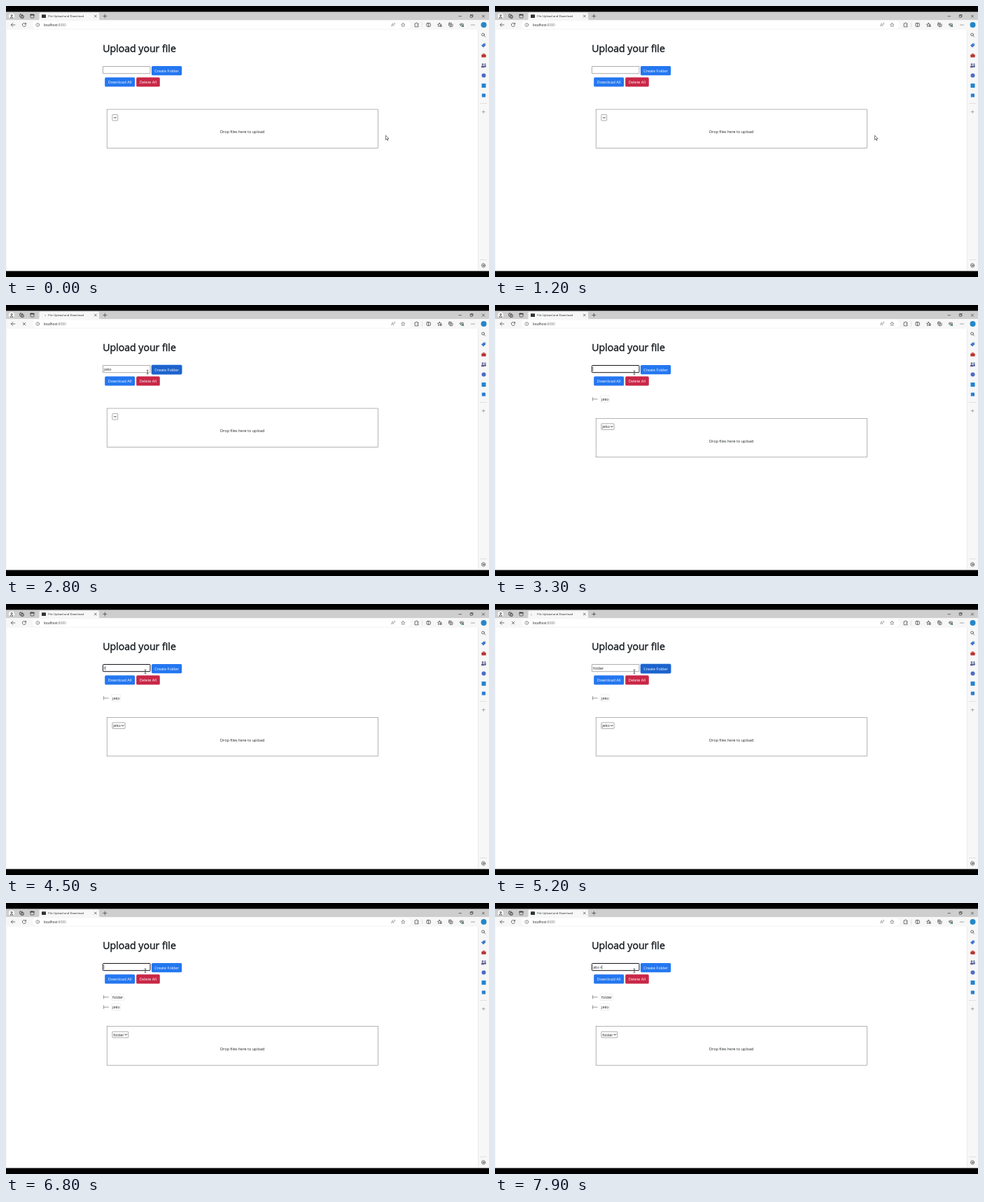
Write an HTML page that moves like this. It is 690x388 px and loops after 8000 ms.

```html
<!DOCTYPE html>
<html lang="en">
<head>
<meta charset="utf-8">
<title>File Upload and Download</title>
<style>
html, body { margin: 0; width: 100%; height: 100%; overflow: hidden; background: #000; }
svg { display: block; width: 690px; height: 388px; }
text { font: 5.5px 'Open Sans', 'Noto Sans', sans-serif; fill: #1c2024; white-space: pre; }
.ink { fill: none; stroke: #3c3c3c; stroke-width: .7; stroke-linecap: round; stroke-linejoin: round; }
.btn { fill: #fff; }
.head { font-size: 14.1px; stroke: #1c2024; stroke-width: .45; }
</style>
</head>
<body>
<svg viewBox="0 0 690 388">
  <rect width="690" height="388" fill="#000"/>
  <rect y="8.600" width="690" height="370.900" fill="#f7f7f7"/>
  <rect y="8.600" width="690" height="11.400" fill="#cecece"/>
  <path d="M46 20q1.500 0 1.500-1.500V11q0-1.500 1.500-1.500H131.500q1.500 0 1.500 1.500v7.500q0 1.500 1.500 1.500z" fill="#f7f7f7"/>
  <rect x="38" y="21.500" width="540" height="11" rx="5.500" fill="#fff"/>
  <rect x="1" y="34" width="673" height="344.500" rx="1.500" fill="#fff"/>
  <path d="M674.500 34V378.500" stroke="#e9e9e9" stroke-width=".8"/>
  <path d="M594.500 23.500v7M677 139.500h10M677 363.500h10" stroke="#d8d8d8" stroke-width=".7"/>

  <!-- tab strip -->
  <circle cx="8" cy="14.500" r="4" fill="#fff"/>
  <g class="ink">
    <circle cx="8" cy="13.400" r="1.100"/>
    <path d="M6 17q0-1.500 2-1.500t2 1.500z"/>
    <rect x="19.500" y="12" width="4" height="4" rx="1"/>
    <rect x="21.300" y="13.500" width="4" height="4" rx="1" fill="#999"/>
    <rect x="35" y="12" width="5" height="5" rx=".8"/>
    <path d="M35 12.700h5" stroke-width="1.400"/>
    <path d="M126.300 13l3 3m0-3l-3 3M138.800 14.500h5m-2.500-2.500v5"/>
    <path d="M647 14.700h3.500M680.300 13l3.200 3.200m0-3.200l-3.200 3.200M664 13v-.5h3v3h-.6"/>
    <rect x="663.200" y="13.300" width="3" height="3" rx=".5"/>
  </g>
  <rect id="icon" x="51" y="12.300" width="6" height="4.600" rx=".5" fill="#2f3437"/>
  <path id="spin" class="ink" style="stroke:#777"/>
  <text id="title" x="60.300" y="16" style="font-size:4.150px"></text>

  <!-- toolbar -->
  <g class="ink">
    <path d="M12.800 27H7.300m2.400-2.400L7.300 27l2.400 2.400"/>
    <path id="reload" d="M28.300 25.700a2.600 2.600 0 1 0 .2 2M28.500 24.300v1.700h-1.700"/>
    <path id="stop" d="M24.200 25.200l3.600 3.600m0-3.600l-3.600 3.600"/>
    <g style="stroke:#777">
      <circle cx="45.300" cy="27" r="2.500"/>
      <path d="M45.300 26.800v1.300M45.300 25.600v.1"/>
      <path d="M550.500 29l1.700-4.300 1.700 4.300m-2.800-1.400h2.200M554.300 24.500q1 .8 0 1.800M555.300 23.900q1.500 1.400 0 2.900" stroke-width=".5"/>
    </g>
    <path class="star" style="stroke:#777"/>
    <path d="M584.500 25h1.200q0-1 .9-1t.9 1h1.500v1.500q-1.200 0-1.200.8t1.200.8v1.700h-4.500z"/>
    <rect x="601" y="24.700" width="5.400" height="4.600" rx=".8"/>
    <path d="M603.700 24.200v5.600"/>
    <path class="star"/>
    <path d="M621 29h1.500m-1.500-1h1.500"/>
    <rect x="632.500" y="24.300" width="4" height="4" rx=".8"/>
    <path d="M634.200 29.700h2.800q1 0 1-1v-2.600M634.500 25.500v1.600m-.8-.8h1.600"/>
    <path d="M651 29.300q-2.700-1.800-2.600-3.400.6-1.700 2.600-.3 2-1.400 2.600.3.100 1.600-2.600 3.400M649 27.200h1l.6-1 .8 1.600.5-.6h1.300"/>
  </g>
  <circle cx="653" cy="28.900" r="1.200" fill="#2f9a58"/>
  <g fill="#3c3c3c"><circle cx="665" cy="27" r=".55"/><circle cx="667" cy="27" r=".55"/><circle cx="669" cy="27" r=".55"/></g>
  <text x="53.700" y="28.800" style="font-size:4.750px">localhost<tspan fill="#777">:8080</tspan></text>

  <!-- sidebar -->
  <circle cx="682.500" cy="27" r="4" fill="#2587c8"/>
  <g class="ink">
    <circle cx="681.500" cy="41" r="1.900"/><path d="M683 42.500l1.700 1.700"/>
    <path d="M682.200 149.500v4m-2-2h4" stroke-width=".5" style="stroke:#666"/>
    <circle cx="682.200" cy="371.500" r="1"/>
    <path d="M682.200 368.700l2.400 1.400v2.800l-2.400 1.400-2.400-1.400v-2.800z"/>
  </g>
  <path d="M682.500 53.500h2.700v2.700l-3.300 3.300-2.900-2.900z" fill="#3d76cc"/>
  <circle cx="684.200" cy="54.500" r=".5" fill="#fff"/>
  <path d="M679.700 69.700h5.600v3.500h-5.600zM681.300 69.400v-1h2.400v1" fill="#c43a35" stroke="#c43a35" stroke-width=".6"/>
  <path d="M679.500 71.400h6" stroke="#7d2220" stroke-width=".6"/>
  <g fill="#665a86"><circle cx="681" cy="83.500" r="1.300"/><path d="M679 88.300v-1.800q0-1.300 2-1.300t2 1.300v1.800z"/></g>
  <g fill="#3c5d9c"><circle cx="684.400" cy="83.300" r="1.100"/><path d="M683.300 88v-3.200h2.400v2.600z"/></g>
  <circle cx="682.500" cy="99.500" r="3" fill="#4c6bc8"/>
  <rect x="679.500" y="111" width="6" height="6" rx=".6" fill="#2384d0"/>
  <rect x="679.800" y="125.500" width="5.200" height="5" rx=".6" fill="#2b7fd0"/>

  <!-- page -->
  <text class="head" x="138.200" y="65.500">Upload your file</text>
  <rect id="field" x="138.500" y="86.500" width="67.500" height="10.200" fill="#fff"/>
  <text id="typed" x="140" y="93.900"></text>
  <path id="caret" stroke="#333" stroke-width=".5"/>
  <rect id="ring" x="207.300" y="85.300" width="44.600" height="14.600" rx="2.400" fill="#9fc2f8"/>
  <rect id="create" x="208" y="86" width="43.200" height="13.200" rx="1.600"/>
  <text class="btn" x="229.600" y="94.500" text-anchor="middle">Create Folder</text>
  <rect x="141.200" y="102.300" width="43" height="13.300" rx="1.600" fill="#2477f0"/>
  <text class="btn" x="162.700" y="111" text-anchor="middle">Download All</text>
  <rect x="186.200" y="102.300" width="33.600" height="13.300" rx="1.600" fill="#c92747"/>
  <text class="btn" x="203" y="111" text-anchor="middle">Delete All</text>
  <g id="tree"></g>
  <g id="drop">
    <rect x="144.200" y="148" width="387.300" height="55.500" fill="#fff" stroke="#777" stroke-width=".55"/>
    <rect id="pick" x="151.900" y="155.500" height="8.600" rx=".8" fill="#fff" stroke="#767676" stroke-width=".6"/>
    <text id="choice" x="153.200" y="162"></text>
    <path id="chev" class="ink" style="stroke:#111;stroke-width:.9"/>
    <text x="337.800" y="182.200" text-anchor="middle" style="font-size:5.470px">Drop files here to upload</text>
  </g>
  <path id="arrow" d="M0 0v6.300l1.500-1.400 1 2.300.9-.4-1-2.200h2z" fill="#fff" stroke="#222" stroke-width=".6"/>
  <path id="beam" d="M-1.300-2.800q1.300 0 1.300.7 0-.7 1.300-.7M0-2.100v4.200M-1.300 2.800q1.300 0 1.300-.7 0 .7 1.300.7" fill="none" stroke="#222" stroke-width=".7"/>
</svg>
<script>
const LOOP = 8000, ROW = 14.35;
const el = id => document.getElementById(id);
const set = (id, attrs) => { for (const k in attrs) el(id).setAttribute(k, attrs[k]); };
const show = (id, on) => { el(id).style.display = on ? '' : 'none'; };

// Latest value whose start time has been reached
const at = (t, steps) => steps.reduce((v, [start, next]) => t >= start ? next : v, steps[0][1]);

const typing = [[0, ''], [2200, 'jek'], [2400, 'jeko'], [2900, ''],
  [4500, 'f'], [4600, 'fo'], [4700, 'fol'], [4800, 'fold'], [4900, 'folde'], [5000, 'folder'], [5400, ''],
  [6900, 'a'], [7100, 'abc'], [7500, 'abc-'], [7900, 'abc-t']];
const focus = [[0, ''], [1900, 'field'], [2600, 'button'], [2900, ''], [3100, 'field'],
  [5100, 'button'], [5400, ''], [6800, 'field']];
const caretOn = [[0, 1], [3700, 0], [4000, 1], [4300, 0], [4500, 1]];
const folders = [[0, []], [2900, ['jeko']], [5400, ['folder', 'jeko']]];
const loading = [[0, 0], [2700, 1], [3000, 0], [5200, 1], [5500, 0]];
const fresh = [[0, 0], [2900, 1], [3000, 0], [5400, 1], [5500, 0]];
const pointer = [[0, [542.5, 185.3]], [1600, [490, 158]], [1700, [330, 98]], [1800, [216, 68]],
  [1900, [184.5, 96]], [2600, [194, 96]], [2700, [200, 96]], [2800, [202.2, 96]], [3000, [199, 96.8]]];

function starPath(cx, cy) {
  const pts = Array.from({ length: 10 }, (_, i) => {
    const r = i % 2 ? 1.35 : 2.9, a = Math.PI * (i / 5 - .5);
    return (cx + r * Math.cos(a)).toFixed(2) + ' ' + (cy + r * Math.sin(a)).toFixed(2);
  });
  return 'M' + pts.join('L') + 'z';
}
document.querySelectorAll('.star').forEach((s, i) => s.setAttribute('d', starPath(i ? 619.3 : 567.3, 27.2)));

function drawTree(list) {
  el('tree').innerHTML = list.map((name, i) => {
    const y = 134.6 + i * ROW;
    const w = name === 'folder' ? 18 : 13;
    return `<path d="M139.600 ${y - 2.6}v5.400M139.600 ${y + .2}h7" fill="none" stroke="#555" stroke-width=".6"/>` +
      `<rect x="150.500" y="${y - 4.8}" width="${w}" height="9.600" rx="1" fill="#fff" stroke="#e6e6e6" stroke-width=".6"/>` +
      `<text x="152" y="${y + 1.9}">${name}</text>`;
  }).join('');
}

function drawDrop(list) {
  const name = list[0] || '';
  el('choice').textContent = name;
  const w = name ? el('choice').getComputedTextLength() + 7.6 : 7.8;
  const x = 151.9 + w - (name ? 3.4 : 3.8);
  set('pick', { width: w });
  set('chev', { d: `M${x - 1.4} 159.200l1.400 1.400 1.400-1.400` });
  set('drop', { transform: `translate(0 ${list.length * ROW})` });
}

function drawSpin(t, isNew) {
  const a = t / 1000 * Math.PI * 2, r = 2.4, span = isNew ? 1.6 : .6;
  const p = b => `${54 + r * Math.cos(b)} ${14.5 + r * Math.sin(b)}`;
  const from = isNew ? a - Math.PI * 1.6 + 1.8 : a + 1.2;
  set('spin', { d: `M${p(from)}A${r} ${r} 0 0 1 ${p(from + span)}` });
}

function render(time) {
  const t = Math.floor(time % LOOP / 100) * 100;
  const active = at(t, focus), busy = at(t, loading), isNew = at(t, fresh);
  const list = at(t, folders), [x, y] = at(t, pointer);

  el('title').textContent = isNew ? 'localhost:8080' : 'File Upload and Download';
  show('icon', !busy);
  show('spin', busy);
  show('reload', !busy);
  show('stop', busy);
  drawSpin(t, isNew);

  const inField = active === 'field', onButton = active === 'button';
  el('typed').textContent = at(t, typing);
  const end = 140.2 + el('typed').getComputedTextLength();
  set('caret', { d: `M${end} 88.700v6` });
  show('caret', inField && at(t, caretOn));
  set('field', { stroke: inField ? '#15151c' : '#767676', 'stroke-width': inField ? 1 : .6, rx: inField ? .8 : .3 });
  show('ring', onButton);
  set('create', { fill: onButton ? '#1d63cc' : '#2477f0' });

  drawTree(list);
  drawDrop(list);

  const overText = t >= 1900;
  show('arrow', !overText);
  show('beam', overText);
  set(overText ? 'beam' : 'arrow', { transform: `translate(${x} ${y})` });
}

function tick() {
  render(performance.now());
  requestAnimationFrame(tick);
}
tick();
</script>
</body>
</html>
```
